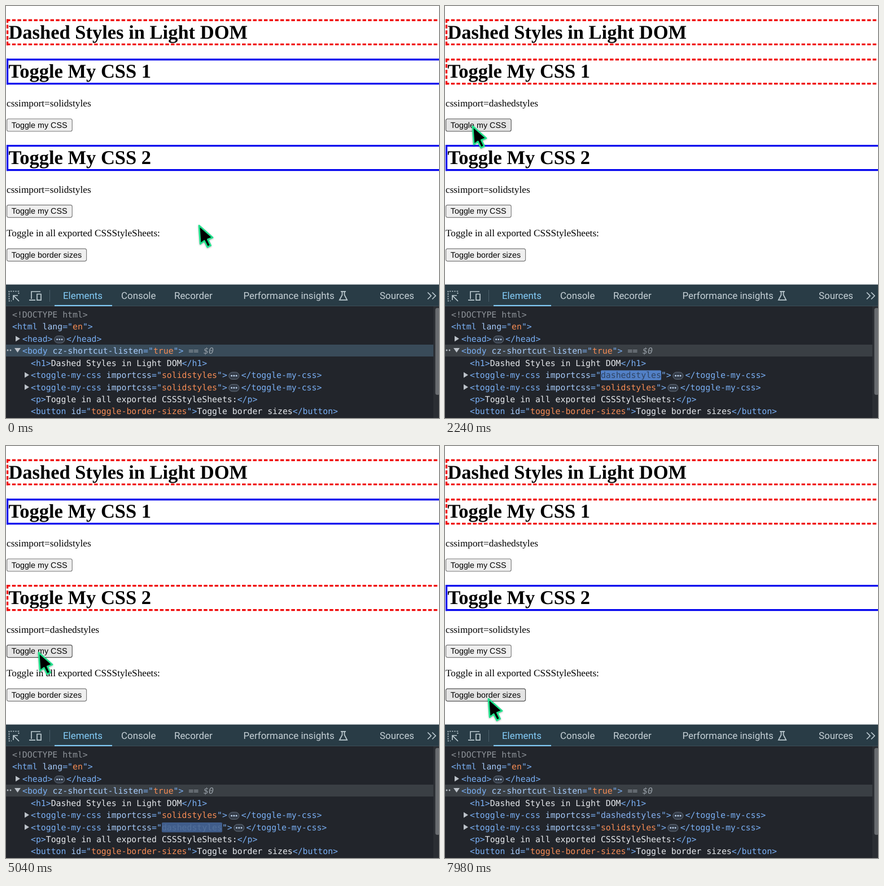
Animation, 767 px wide and 730 px high, one loop 8000 ms. Source, as an HTML page:

```html
<!DOCTYPE html>
<html lang="en">
<head>
<meta charset="utf-8">
<title>Toggling adopted stylesheets</title>
<style>
html, body { margin: 0; width: 100%; height: 100%; overflow: hidden; background: #fff; }
svg { display: block; width: 767px; height: 730px; }
text { white-space: pre; text-rendering: geometricPrecision; }
.h { font: bold 34.5px "Liberation Serif", Times, serif; }
.p { font: 17.25px "Liberation Serif", Times, serif; }
.b { font: 14.33px "Liberation Sans", Arial, sans-serif; }
.tab { font: 16.9px Roboto, sans-serif; fill: #c5d0d6; }
.tab.on { fill: #84ccf8; }
.code { font: 14.82px "DejaVu Sans Mono", monospace; fill: #e6e9ed; }
.tag { fill: #7ab0f5; }
.attr { fill: #a6caf9; }
.val { fill: #f88d55; }
.dim { fill: #8f949a; }
.eq { fill: #9aa2aa; font-style: italic; }
.icon { fill: none; stroke: #bccad1; stroke-width: 1.7; }
</style>
</head>
<body>
<svg id="stage" viewBox="0 0 767 730"></svg>
<script>
const LOOP = 8000, STEP = 70, ADV = 8.92, RELEASE = 90, FLASH = 1400;
const RED = '#f00000', BLUE = '#0000ee';
const stage = document.getElementById('stage');

function add(parent, name, attrs = {}, content) {
  const el = document.createElementNS('http://www.w3.org/2000/svg', name);
  set(el, attrs);
  if (content !== undefined) el.textContent = content;
  parent.appendChild(el);
  return el;
}
function set(el, attrs) {
  for (const key in attrs) el.setAttribute(key, attrs[key]);
}
const rect = (parent, x, y, width, height, fill, rx = 0) =>
  add(parent, 'rect', { x, y, width, height, fill, rx });
const path = (parent, d, attrs) => add(parent, 'path', { d, ...attrs });
const label = (x, y, cls, text) => add(stage, 'text', { x, y, class: cls }, text);

// Page
function heading(y, text) {
  const top = path(stage, `M1 ${y + 1.7}H780M1 ${y + 44.6}H780`, { fill: 'none', 'stroke-width': 3.2 });
  const side = path(stage, `M2.6 ${y}V${y + 46.2}`, { fill: 'none', 'stroke-width': 3.2 });
  label(4.4, y + 34.3, 'h', text);
  return dashed => {
    set(top, { stroke: dashed ? RED : BLUE, 'stroke-dasharray': dashed ? '6.45 3.25' : 'none' });
    set(side, { stroke: dashed ? RED : BLUE, 'stroke-dasharray': dashed ? '6.45 3.48' : 'none' });
  };
}
function button(y, width, text) {
  const box = rect(stage, 1.6, y + .6, width, 22, '#efefef', 3);
  label(9.8, y + 16.3, 'b', text);
  return {
    holds: (x, cy) => x > 1 && x < width + 2 && cy > y && cy < y + 23,
    paint(hover, pressed) {
      set(box, {
        fill: pressed ? '#f6f6f6' : hover ? '#e4e4e4' : '#efefef',
        stroke: pressed ? '#8d8d8d' : hover ? '#505050' : '#767676',
        'stroke-width': 1.1
      });
    }
  };
}
rect(stage, 0, 0, 767, 730, '#fff');
heading(23.4, 'Dashed Styles in Light DOM')(true);
const frames = [heading(93.1, 'Toggle My CSS 1'), heading(246, 'Toggle My CSS 2')];
const notes = [label(1, 178, 'p'), label(1, 330.7, 'p')];
label(1, 408.2, 'p', 'Toggle in all exported CSSStyleSheets:');
const buttons = [
  button(199.4, 115.6, 'Toggle my CSS'),
  button(352, 115.6, 'Toggle my CSS'),
  button(429.5, 141, 'Toggle border sizes')
];

// Inspector toolbar
rect(stage, 0, 493.5, 767, 38.5, '#293c46');
rect(stage, 0, 531, 767, 199, '#22252b');
rect(stage, 0, 531, 767, 1, '#3c4d57');
path(stage, 'M22.5 510V505.5H5.5V522.5H10', { class: 'icon', 'stroke-dasharray': '2.2 2' });
path(stage, 'M23 523L13.5 513.5M13 521V513H21', { class: 'icon', 'stroke-width': 2 });
path(stage, 'M45 519V506H61M41 521.2H52M55 510.5H62V521.2H55Z', { class: 'icon' });
path(stage, 'M593 505.8H602M595.5 506V512L590.8 520.8H604.2L599.5 512V506', { class: 'icon' });
path(stage, 'M747 507.5L753 513.5L747 519.5M755 507.5L761 513.5L755 519.5', { class: 'icon' });
rect(stage, 77, 503, 1, 21, '#4b5f6a');
label(101, 519.2, 'tab on', 'Elements');
[[204, 'Console'], [298, 'Recorder'], [420.5, 'Performance insights'], [662, 'Sources']]
  .forEach(([x, text]) => label(x, 519.2, 'tab', text));
rect(stage, 86, 529.8, 102, 2.2, '#84ccf8');

// Inspector tree
const baseline = row => 551.8 + 21.45 * row;
function code(parent, x, row, ...parts) {
  const line = add(parent, 'text', { x, y: baseline(row), class: 'code' });
  parts.forEach(([cls, text]) => add(line, 'tspan', { class: cls }, text));
  return line;
}
function pill(parent, x, row) {
  const y = baseline(row) - 4.3;
  set(rect(parent, x, y - 5.8, 18, 12.4, '#343c48', 6), { stroke: '#66717e', 'stroke-width': 1 });
  for (const dx of [4.8, 9, 13.2]) add(parent, 'circle', { cx: x + dx, cy: y + .4, r: 1.4, fill: '#c5d9f2' });
}
function arrow(x, row, open) {
  const y = baseline(row) - 5.2;
  path(stage, open ? `M${x - 1} ${y - 5}h11l-5.5 8z` : `M${x} ${y - 5}v10l8-5z`, { fill: '#bcc2c9' });
}
const selected = rect(stage, 0, 600, 757, 21, '#394b59');
for (const cx of [3, 8]) add(stage, 'circle', { cx, cy: 610, r: 1.4, fill: '#b4bbc2' });
code(stage, 11, 0, ['dim', '<!DOCTYPE html>']);
code(stage, 11, 1, ['tag', '<html '], ['attr', 'lang'], ['tag', '="'], ['val', 'en'], ['tag', '">']);
arrow(17, 2);
code(stage, 29, 2, ['tag', '<head>']);
pill(stage, 85.8, 2);
code(stage, 107, 2, ['tag', '</head>']);
arrow(16, 3, true);
code(stage, 29, 3, ['tag', '<body '], ['attr', 'cz-shortcut-listen'], ['tag', '="'], ['val', 'true'], ['tag', '">'], ['eq', ' == $0']);
code(stage, 44, 4, ['tag', '<h1>'], ['', 'Dashed Styles in Light DOM'], ['tag', '</h1>']);

function toggleRow(row) {
  const x = 44, valueX = x + 26 * ADV;
  arrow(33, row);
  code(stage, x, row, ['tag', '<toggle-my-css '], ['attr', 'importcss'], ['tag', '="']);
  const glow = rect(stage, valueX, baseline(row) - 13.5, 0, 17.5, 'none', 2);
  const value = code(stage, valueX, row, ['val', '']).firstChild;
  const tail = add(stage, 'g');
  const end = valueX + 11 * ADV;
  code(tail, end, row, ['tag', '">']);
  pill(tail, end + 2 * ADV + 3, row);
  code(tail, end + 2 * ADV + 24.8, row, ['tag', '</toggle-my-css>']);
  // The glow fades over the first 80 %; the text stays blue until the flash ends.
  return (name, p) => {
    const k = Math.min(1, p / .8);
    value.textContent = name;
    value.style.fill = p < 1 ? blend(k, [26, 41, 64], [138, 182, 246]) : '';
    set(glow, {
      width: name.length * ADV,
      fill: k < 1 ? blend(k, [93, 149, 234], [34, 37, 43]) : 'none'
    });
    set(tail, { transform: `translate(${(name.length - 11) * ADV})` });
  };
}
const rows = [toggleRow(5), toggleRow(6)];
code(stage, 44, 7, ['tag', '<p>'], ['', 'Toggle in all exported CSSStyleSheets:'], ['tag', '</p>']);
code(stage, 44, 8, ['tag', '<button '], ['attr', 'id'], ['tag', '="'], ['val', 'toggle-border-sizes'], ['tag', '">'],
  ['', 'Toggle border sizes'], ['tag', '</button>']);
rect(stage, 757, 532, 10, 198, '#2b2e33');
rect(stage, 760.5, 535, 8, 154, '#696c70', 3.5);

// Pointer
const ring = add(stage, 'circle', { fill: 'none', stroke: '#f3b877' });
const pointer = add(stage, 'g');
pointer.style.filter = 'drop-shadow(0 1px 1.5px rgba(0,0,0,.3))';
path(pointer, 'M0 -2L2.2 30.5L9.3 25L14.8 36.2L20.6 33.3L15.4 22.6L24 19.2Z',
  { fill: '#000', stroke: '#1fe28b', 'stroke-width': 2.8, 'stroke-linejoin': 'round' });
const beam = add(stage, 'g');
const beamShape = 'M-6 -17Q0 -17 0 -11V11Q0 17 -6 17M6 -17Q0 -17 0 -11V11Q0 17 6 17M-3.5 3H3.5';
[['#1fe28b', 7], ['#17382b', 2.6]].forEach(([stroke, width]) =>
  path(beam, beamShape, { fill: 'none', stroke, 'stroke-width': width, 'stroke-linecap': 'round' }));

// Timing
const clicks = [[0, 1940], [0, 3080], [1, 4390], [1, 5240], [0, 6800]];
const moves = [[100, 1350, 49, 215], [3330, 3950, 58, 368], [5400, 6300, 55, 217], [7200, 7830, 77, 450]];
const textAreas = [[93, 138, 257], [162, 183, 165], [246, 291, 257], [315, 336, 151], [392, 413, 272]];

function blend(k, from, to) {
  return `rgb(${from.map((v, i) => Math.round(v + (to[i] - v) * k))})`;
}
function position(t) {
  let x = 342, y = 391;
  for (const [start, end, toX, toY] of moves) {
    const k = Math.min(1, Math.max(0, (t - start) / (end - start)));
    const eased = k * k * (3 - 2 * k);
    x += (toX - x) * eased;
    y += (toY - y) * eased;
  }
  return [x, y];
}

function draw(t) {
  const [x, y] = position(t);
  const click = clicks.filter(c => c[1] <= t).pop();
  const age = click ? t - click[1] : Infinity;

  frames.forEach((paint, i) => {
    const past = clicks.filter(c => c[0] === i && c[1] + RELEASE <= t);
    const dashed = past.length % 2 === 1;
    const name = dashed ? 'dashedstyles' : 'solidstyles';
    const since = past.length ? t - past[past.length - 1][1] - RELEASE : FLASH;
    paint(dashed);
    notes[i].textContent = 'cssimport=' + name;
    rows[i](name, since / FLASH);
  });
  buttons.forEach(b => {
    const hover = b.holds(x, y);
    b.paint(hover, hover && age < RELEASE);
  });
  set(selected, { fill: click ? '#3a3f44' : '#394b59' });

  const showRing = age < 260;
  set(ring, {
    cx: x, cy: y - 2, r: showRing ? 13 + age * .1 : 0,
    'stroke-width': age < 110 ? 2.6 : 1.2,
    opacity: showRing ? (age < 110 ? .3 : .5) : 0
  });
  const overText = textAreas.some(([top, bottom, right]) => y > top && y < bottom && x < right)
    && !buttons.some(b => b.holds(x, y));
  set(pointer, { transform: `translate(${x} ${y})`, opacity: overText ? 0 : 1 });
  set(beam, { transform: `translate(${x} ${y})`, opacity: overText ? 1 : 0 });
}

const begin = performance.now();
function tick() {
  const t = (performance.now() - begin) % LOOP;
  draw(Math.floor(t / STEP) * STEP);
  requestAnimationFrame(tick);
}
tick();
</script>
</body>
</html>
```
